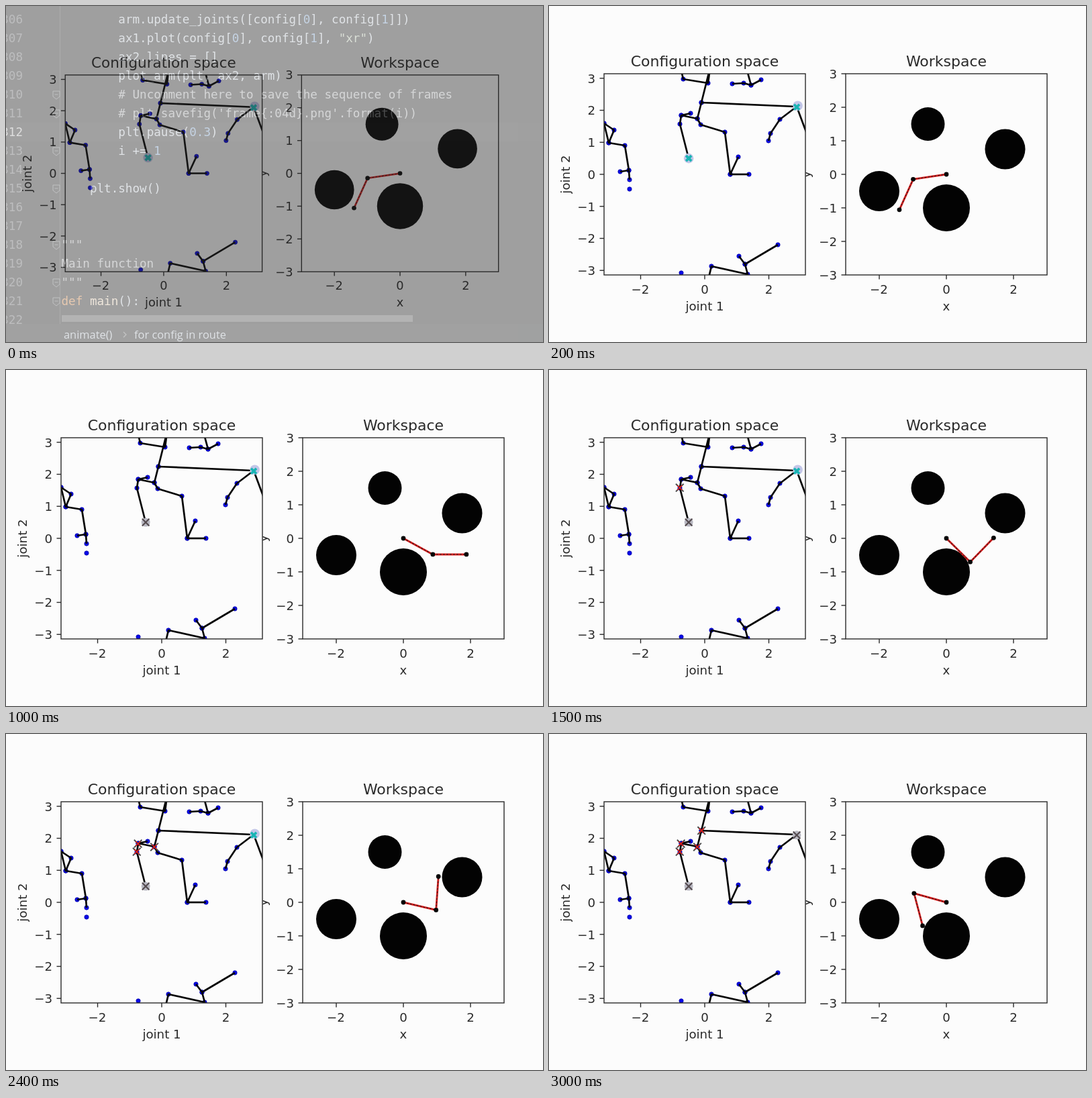
Write an HTML page that moves like this. It is 800x501 px and loops after 4.4 s.

```html
<!DOCTYPE html>
<html lang="en">
<head>
<meta charset="utf-8">
<title>Arm planning</title>
<style>
  html, body { margin: 0; width: 100%; height: 100%; overflow: hidden; background: #282828; }
  svg { display: block; width: 100vw; height: 100vh; }
  #code { font: 17.6px "DejaVu Sans Mono", monospace; fill: #bcc3cb; white-space: pre; }
  #code .crumb { font: 16.4px "Open Sans", sans-serif; }
  #slide { font: 18.2px "DejaVu Sans", sans-serif; fill: #2a2a2a; }
  #slide .title { font-size: 22px; }
</style>
</head>
<body>
<svg id="stage" viewBox="0 0 800 501">
  <defs>
    <clipPath id="plotClip"><rect x="82" y="101" width="300" height="300"/></clipPath>
    <clipPath id="labelClip"><rect x="382.5" y="230" width="20" height="40"/></clipPath>
  </defs>
  <g id="code"></g>
  <g id="slide"></g>
</svg>
<script>
const NS = "http://www.w3.org/2000/svg";
const LOOP = 4400, STEP = 100;
const $ = id => document.getElementById(id);

function add(parent, tag, attrs, text) {
  const node = document.createElementNS(NS, tag);
  for (const key in attrs) node.setAttribute(key, attrs[key]);
  if (text !== undefined) node.textContent = text;
  parent.appendChild(node);
  return node;
}
const group = (parent, attrs = {}) => add(parent, "g", attrs);
const path = (parent, d, stroke, width, more = {}) =>
  add(parent, "path", { d, stroke, "stroke-width": width, fill: "none", ...more });
const dot = (parent, [cx, cy], r, fill, more = {}) => add(parent, "circle", { cx, cy, r, fill, ...more });
const label = (parent, x, y, text, anchor = "middle", more = {}) =>
  add(parent, "text", { x, y, "text-anchor": anchor, ...more }, text);
const toPath = points => "M" + points.map(p => p.join(",")).join("L");
const cross = ([x, y], s) =>
  `M${x - s},${y - s}L${x + s},${y + s}M${x - s},${y + s}L${x + s},${y - s}`;

// Code editor behind the slide
function buildCode() {
  const code = $("code");
  const box = (x, y, width, height, fill) => add(code, "rect", { x, y, width, height, fill });
  box(0, 0, 800, 501, "#282828");
  box(0, 174, 800, 28, "#2c2c2c");
  box(80, 0, 1, 474, "#484848");
  box(0, 474, 800, 27, "#2c2d2e");
  box(83, 461, 523, 10, "#565656");

  const colors = { n: "#7f9fc4", c: "#a4a6a8", s: "#b0bba8", k: "#cc8850", f: "#e0cdb4" };
  const lines = [
    [0, 8, "arm.update_joints([config[~n0~], config[~n1~]])"],
    [1, 8, "ax1.plot(config[~n0~], config[~n1~], ~s\"xr\"~)"],
    [2, 8, "ax2.lines = []"],
    [3, 8, "plot_arm(plt, ax2, arm)"],
    [4, 8, "~c# Uncomment here to save the sequence of frames~"],
    [5, 8, "~c# plt.savefig('frame{:04d}.png'.format(i))~"],
    [6, 8, "plt.pause(~n0.3~)"],
    [7, 8, "i += ~n1~"],
    [9, 4, "plt.show()"],
    [12, 0, "~c\"\"\"~"],
    [13, 0, "~cMain function~"],
    [14, 0, "~c\"\"\"~"],
    [15, 0, "~kdef~ ~fmain~():"]
  ];
  for (const [row, indent, text] of lines) {
    const line = add(code, "text", { x: 82.5 + indent * 10.6, y: 26 + row * 28 });
    text.split("~").forEach((part, i) => {
      const colored = i % 2;
      add(line, "tspan", colored ? { fill: colors[part[0]] } : {}, colored ? part.slice(1) : part);
    });
  }
  for (let row = 0; row < 17; row++)
    label(code, 25, 26 + row * 28, 306 + row, "end", { fill: row === 6 ? "#b8b8b8" : "#6c6e70" });
  for (const row of [4, 5, 7, 9, 12, 14, 15])
    path(code, `M70,${15 + row * 28}h10v8l-5,4l-5,-4zM72.5,${20 + row * 28}h5`, "#747678", 1);
  add(code, "text", { x: 86, y: 496, class: "crumb" }, "animate()");
  path(code, "M175,486l4,4l-4,4", "#808080", 1.2);
  add(code, "text", { x: 191, y: 496, class: "crumb" }, "for config in route");
}

const toPlot = ([a, b]) => [232 + 47.75 * a, 251 - 47.75 * b];
const toWork = ([x, y]) => [592 + 50 * x, 251 - 50 * y];

function buildAxes(slide, left, unit, title, xName) {
  const mid = left + 150;
  add(slide, "rect", { x: left, y: 101, width: 300, height: 300, fill: "none", stroke: "#2a2a2a", "stroke-width": 1.4 });
  const name = v => String(v).replace("-", "\u2212");
  for (const v of [-2, 0, 2]) {
    const x = mid + v * unit;
    path(slide, `M${x},401v6.5`, "#2a2a2a", 1.4);
    label(slide, v < 0 ? x - 0.5 : x, 428.5, name(v));
  }
  for (let v = -3; v <= 3; v++) {
    const y = 251 - v * unit;
    path(slide, `M${left},${y}h-6.5`, "#2a2a2a", 1.4);
    label(slide, left - 13, y + 6.8, name(v), "end");
  }
  label(slide, mid, 90, title, "middle", { class: "title" });
  label(slide, mid, 454, xName);
}

// Branches of the search tree, in pixels
const branches = [
  "196,92 200,109 237,115 240,92", "227,144 240,92",
  "273,116 290,115 301,118 316,110", "301,118 294,92",
  "388,201 369,150 227,144 221,168 197,163 211,160",
  "369,150 344,169 330,190 327,201",
  "197,163 195,176 208,227",
  "221,168 226,177 262,188 270,251 282,225", "270,251 298,251",
  "82,175 97,185 89,204 113,208 119,245 106,247",
  "82,175 89,204", "119,245 120,259", "120,273", "197,398",
  "237,409 242,388 296,400 292,385 341,356", "283,373 292,385"
].map(s => s.split(" ").map(p => p.split(",").map(Number)));

const idle = [-2.995, 1];
const route = [
  { at: 1000, config: [-0.5, 0.5] },
  { at: 1400, config: [-0.78, 1.58] },
  { at: 1800, config: [-0.74, 1.83] },
  { at: 2200, config: [-0.23, 1.73] },
  { at: 2600, config: [-0.1, 2.24] },
  { at: 2900, config: [2.87, 2.1] }
];
const obstacles = [[-0.55, 1.5, 0.5], [1.75, 0.75, 0.6], [-2, -0.5, 0.6], [0, -1, 0.7]];
const arm = {};

function buildMarkers(parent) {
  route.forEach((stop, i) => {
    const p = toPlot(stop.config);
    const isEnd = i === 0 || i === route.length - 1;
    stop.visited = group(parent);
    if (isEnd) {
      stop.waiting = group(parent);
      dot(stop.waiting, [p[0] + (i ? 1.5 : 0), p[1] - (i ? 2 : 0)], 7.3, "#c3c6e8");
      path(stop.waiting, cross(p, 4), "#18b4b4", 3.8);
      dot(stop.visited, p, 6.4, "#b8b8c2");
      path(stop.visited, cross(p, 5.3), "#554c50", 2.2);
    } else {
      path(stop.visited, cross(p, 5.8), "#4a4a4a", 2);
      path(stop.visited, cross(p, 3.4), "#e01818", 1.6);
    }
  });
}

function buildSlide() {
  const slide = $("slide");
  add(slide, "rect", { x: -50, y: -50, width: 900, height: 620, fill: "#fcfcfc" });
  const plot = group(slide, { "clip-path": "url(#plotClip)" });
  branches.flat().forEach(p => dot(plot, p, 3.2, "#0808e8", { stroke: "#0505a0", "stroke-width": 0.7 }));
  branches.forEach(b => path(plot, toPath(b), "#050505", 2.7, { "stroke-linejoin": "round" }));
  buildMarkers(plot);
  buildAxes(slide, 82, 47.75, "Configuration space", "joint 1");
  label(slide, 0, 0, "joint 2", "middle", { transform: "translate(30.5 251) rotate(-90)" });

  for (const [x, y, r] of obstacles) dot(slide, toWork([x, y]), r * 50, "#030303");
  arm.base = path(slide, "", "#e01c1c", 2.9);
  arm.core = path(slide, "", "#3a2020", 1.3, { "stroke-dasharray": "3 2" });
  arm.joints = [0, 1, 2].map(() => dot(slide, [0, 0], 3.4, "#050505"));
  buildAxes(slide, 442, 50, "Workspace", "x");
  const yName = group(slide, { "clip-path": "url(#labelClip)" });
  label(yName, 0, 0, "y", "middle", { transform: "translate(389 251) rotate(-90)" });
}

function poseArm([a, b]) {
  const elbow = [Math.cos(a), Math.sin(a)];
  const hand = [elbow[0] + Math.cos(a + b), elbow[1] + Math.sin(a + b)];
  const points = [[0, 0], elbow, hand].map(toWork);
  arm.base.setAttribute("d", toPath(points));
  arm.core.setAttribute("d", toPath(points));
  arm.joints.forEach((joint, i) => {
    joint.setAttribute("cx", points[i][0]);
    joint.setAttribute("cy", points[i][1]);
  });
}

const show = (node, on) => node.setAttribute("visibility", on ? "visible" : "hidden");

function draw(time) {
  const t = Math.floor((time % LOOP) / STEP) * STEP;
  const [alpha, scale] = [[0.56, 0.978], [0.885, 0.993]][t / STEP] || [1, 1];
  $("slide").setAttribute("opacity", alpha);
  $("slide").setAttribute("transform", `translate(365 185) scale(${scale}) translate(-365 -185)`);

  let config = idle;
  for (const stop of route) {
    const reached = t >= stop.at;
    if (reached) config = stop.config;
    show(stop.visited, reached);
    if (stop.waiting) show(stop.waiting, !reached);
  }
  poseArm(config);
}

buildCode();
buildSlide();
draw(0);
const start = performance.now();
(function tick() {
  draw(Math.max(0, performance.now() - start));
  requestAnimationFrame(tick);
})();
</script>
</body>
</html>
```
